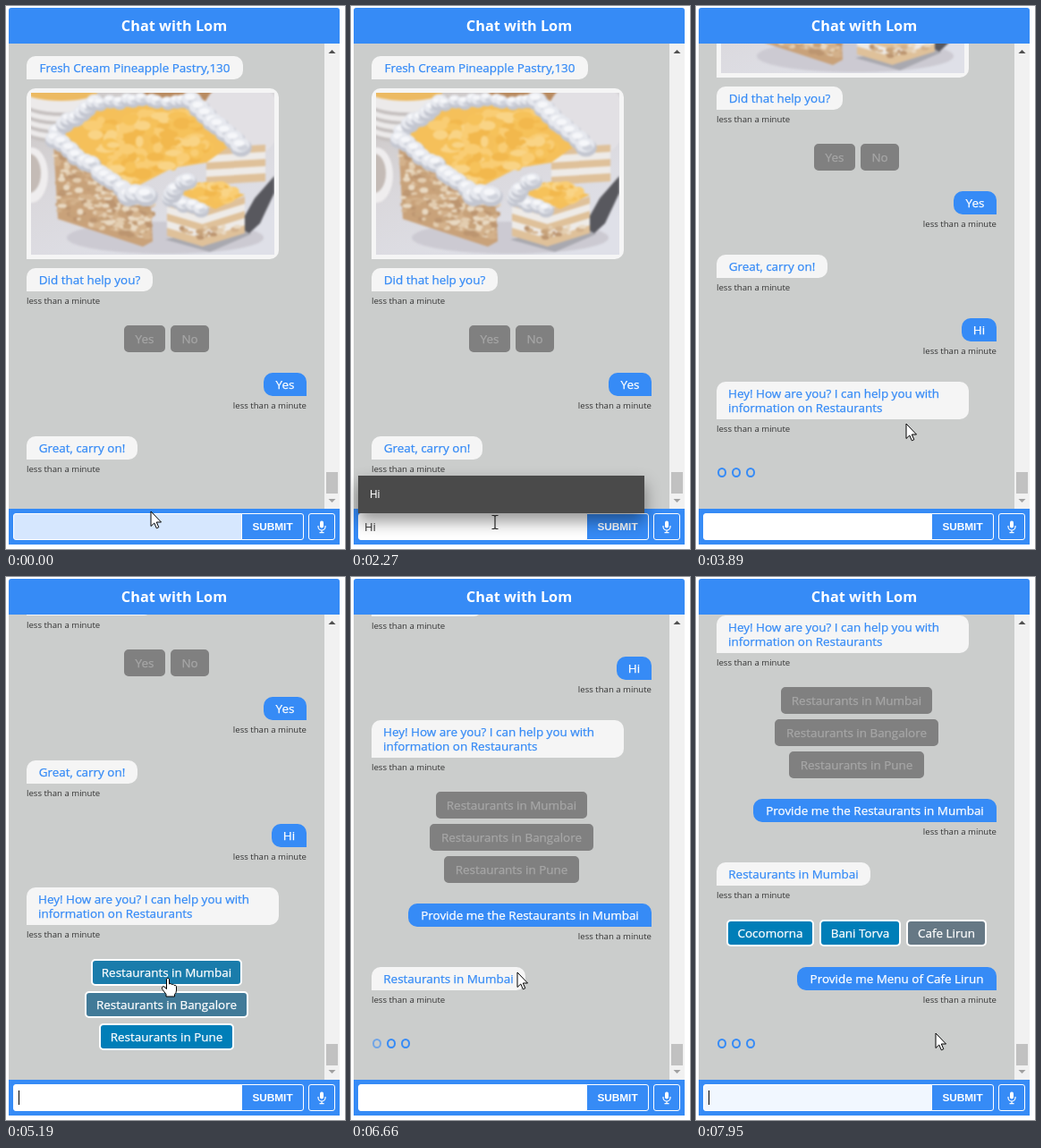
Write an HTML page that moves like this. It is 379x607 px and loops after 8 s.

```html
<!DOCTYPE html>
<html lang="en">
<head>
<meta charset="utf-8">
<title>Chat</title>
<style>
html, body { margin: 0; width: 100%; height: 100%; overflow: hidden; background: #fff; }
#stage { position: relative; width: 379px; height: 607px; overflow: hidden; background: #fff; font: 13.45px/16px "Open Sans", "Noto Sans", sans-serif; white-space: nowrap; }
#stage div, #stage svg { position: absolute; box-sizing: border-box; }
#head { left: 3px; top: 2px; width: 370px; height: 40px; background: #368bf6; border-radius: 3px 3px 0 0; color: #fff; font-weight: 700; font-size: 16.3px; line-height: 41px; text-align: center; }
#view { left: 3px; top: 42px; width: 353px; height: 520px; overflow: hidden; background: #cbcdcc; }
#feed { left: -3px; top: -42px; width: 379px; }
.bubble { padding: 5px 0; text-align: center; background: #f5f5f5; color: #368bf6; border-radius: 10px 10px 10px 0; }
.bubble.wide { text-align: left; padding-left: 13px; white-space: pre; }
.bubble.user { background: #368bf6; color: #fff; border-radius: 10px 10px 0 10px; }
.bubble, .choice { -webkit-text-stroke: .25px; }
.time { font-size: 9.6px; line-height: 14px; color: #333; }
.choice { height: 30px; border: 2px solid #fff; border-radius: 5px; text-align: center; line-height: 26px; color: #fff; }
.dot { width: 10px; height: 11px; border: 2px solid #368bf6; border-radius: 50%; }
#bar { left: 356px; top: 42px; width: 17px; height: 520px; background: #f1f1f1; }
#thumb { left: 2px; top: 479px; width: 13px; height: 24px; background: #c1c1c1; }
#foot { left: 3px; top: 562px; width: 370px; height: 40px; background: #368bf6; }
#input { left: 8px; top: 567px; width: 256px; height: 30px; border: 1px solid #fff; border-radius: 3px 0 0 3px; }
#typed { left: 6px; top: 6px; color: #333; font-size: 13px; }
#caret { left: 14px; top: 574px; width: 1px; height: 16px; background: #000; }
.key { top: 567px; height: 30px; border: 1px solid #fff; border-radius: 3px; background: #368bf6; color: #fff; }
#submit { left: 263px; width: 70px; border-radius: 0 3px 3px 0; text-align: center; font: bold 11.8px/28px "Liberation Sans", Arial, sans-serif; }
#menu { left: 8px; top: 525px; width: 320px; height: 42px; padding-left: 13px; background: #4a4a4a; color: #fff; font: 12px/43px Roboto, sans-serif; box-shadow: 0 9px 18px rgba(0,0,0,.42); }
</style>
</head>
<body>
<div id="stage">
  <div id="head">Chat with Lom</div>
  <div id="view"><div id="feed"></div></div>
  <div id="bar">
    <svg width="17" height="520"><path d="M4.500 11l4-4 4 4z" fill="#505050"/><path d="M4.500 509l4 4 4-4z" fill="#a0a0a0"/></svg>
    <div id="thumb"></div>
  </div>
  <div id="foot"></div>
  <div id="input"><div id="typed"></div></div>
  <div id="caret"></div>
  <div id="submit" class="key">SUBMIT</div>
  <div class="key" style="left:338px;width:30px">
    <svg width="28" height="28" fill="none" stroke="#fff" stroke-width="1.200"><rect x="12" y="7.500" width="4" height="8" rx="2" fill="#fff" stroke="none"/><path d="M10 13v1a4 4 0 0 0 8 0v-1M14 18V20.500M11.500 20.600h5"/></svg>
  </div>
  <div id="menu">Hi</div>
  <svg id="pointer" width="24" height="28" style="left:-.5px;top:-.5px;overflow:visible">
    <path id="arrow" d="M0 0V16.500L3.800 13 6.300 18.800 8.800 17.700 6.300 12H11.500Z" fill="#fff" stroke="#000"/>
    <path id="beam" d="M-3.500-7.500H-1L0-6.500 1-7.500H3.500M0-6.500V7M-3.500 7.500H-1L0 6.500 1 7.500H3.500" fill="none" stroke="#222" stroke-width="1.200"/>
    <path id="hand" d="M-1.500 1.500Q0-1 1.500 1.500V7Q3 5.500 4.300 7.500 6 6.500 7 8.500 9.500 7.500 9.500 11V14Q9.500 17 7.500 18.500V21H-2V18.500L-6.500 12.500Q-7 10-5 9.500L-1.500 12.500Z" fill="#fff" stroke="#000"/>
  </svg>
</div>
<script>
const LOOP = 8000;
const $ = id => document.getElementById(id);
const feed = $('feed');
const clamp = v => Math.max(0, Math.min(1, v));
const ramp = (t, start, length) => clamp((t - start) / length);
const smooth = k => k * k * (3 - 2 * k);
const mix = (a, b, k) => `rgb(${a.map((v, i) => Math.round(v + (b[i] - v) * k))})`;
const within = (t, spans) => spans.some(([a, b]) => t >= a && t < b);
const BLUE = [0, 126, 184], GRAY = [119, 119, 125], OFF = [128, 128, 128], WHITE = [255, 255, 255];

// Feed content is laid out in one tall column; `from` is when an item appears.
const timed = [];
function add(cls, x, y, w, text, from = 0, to = LOOP) {
  const el = document.createElement('div');
  el.className = cls;
  el.textContent = text;
  el.style.cssText = `left:${x}px;top:${y}px;${w ? `width:${w}px` : ''}`;
  feed.append(el);
  timed.push({ el, from, to });
  return el;
}
function bot(y, w, text, from, stamp = true) {
  const wide = text.includes('\n');
  add(wide ? 'bubble wide' : 'bubble', 23, y, w, text, from);
  if (stamp) add('time', 23, y + (wide ? 46 : 30), 0, 'less than a minute', from);
}
function user(y, w, text, from) {
  add('bubble user', 336 - w, y, w, text, from);
  add('time', 236, y + 30, 100, 'less than a minute', from).style.textAlign = 'right';
}

const SENT = [2830, 5760, 7880], REPLY = [3580, 6160], OFFER = [4440, 6940];

drawCake();
bot(56, 242, 'Fresh Cream Pineapple Pastry,130', 0, false);
bot(293, 141, 'Did that help you?', 0);
user(410, 48, 'Yes', 0);
bot(481, 124, 'Great, carry on!', 0);
user(552, 39, 'Hi', SENT[0]);
bot(623, 282, 'Hey! How are you? I can help you with\ninformation on Restaurants', REPLY[0]);
user(828, 272, 'Provide me the Restaurants in Mumbai', SENT[1]);
bot(899, 172, 'Restaurants in Mumbai', REPLY[1]);
user(1016, 223, 'Provide me Menu of Cafe Lirun', SENT[2]);

// x, y, width, label, appears, hover span, disabled at
const choices = [
  [132, 357, 46, 'Yes', 0, null, -999],
  [184, 357, 43, 'No', 0, null, -999],
  [95, 703, 169, 'Restaurants in Mumbai', OFFER[0], [5100, 5760], 5840],
  [88, 739, 183, 'Restaurants in Bangalore', OFFER[0], [4720, 5050], 5840],
  [104, 775, 151, 'Restaurants in Pune', OFFER[0], null, 5840],
  [34, 963, 98, 'Cocomorna', OFFER[1], null, LOOP],
  [138, 963, 91, 'Bani Torva', OFFER[1], null, LOOP],
  [235, 963, 90, 'Cafe Lirun', OFFER[1], [7280, 7880], LOOP]
].map(([x, y, w, text, from, hover, off]) => ({ el: add('choice', x, y, w, text, from), hover, off }));

// Typing dots: from, to, scroll offset
[[SENT[0], REPLY[0], 116], [REPLY[0], OFFER[0], 203], [SENT[1], REPLY[1], 392],
 [REPLY[1], OFFER[1], 463], [SENT[2], LOOP, 580]].forEach(([from, to, scroll]) =>
  [24, 40, 56].forEach((x, i) => {
    const dot = add('dot', x, 516 + scroll, 0, '', from, to);
    if (from === REPLY[1] && !i) dot.style.opacity = 0.6;
  }));

const scrolls = [[0, 0], [SENT[0], 116], [REPLY[0], 203], [OFFER[0], 276], [SENT[1], 392], [REPLY[1], 463], [OFFER[1], 464], [SENT[2], 580]];
const carets = [[700, 1220], [1530, 2040], [2330, 3330], [3895, 4420], [4950, 5400], [5630, 6180], [6700, 7220], [7750, 8000]];
const path = [[0, 162, 565], [49, 162, 565], [50, 162, 574], [200, 162, 574], [230, 161, 577], [2590, 161, 577], [2830, 160, 577],
  [3580, 160, 577], [3890, 235, 467], [4370, 238, 508], [4700, 220, 500], [5050, 186, 468], [5190, 181, 448], [5330, 186, 442],
  [6690, 186, 442], [7000, 215, 476], [7300, 258, 504], [7460, 268, 510], [LOOP, 268, 510]];

function pointerAt(t) {
  const i = Math.max(1, path.findIndex(p => p[0] > t));
  const [t0, x0, y0] = path[i - 1], [t1, x1, y1] = path[i];
  const e = smooth(ramp(t, t0, t1 - t0));
  return [x0 + (x1 - x0) * e, y0 + (y1 - y0) * e];
}

function hoverLevel(t, span) {
  return span ? smooth(Math.min(ramp(t, span[0], 300), 1 - ramp(t, span[1], 300))) : 0;
}

function draw(t) {
  for (const { el, from, to } of timed) el.style.display = t >= from && t < to ? '' : 'none';
  const scroll = scrolls.filter(s => s[0] <= t).pop()[1];
  feed.style.transform = `translateY(${-scroll}px)`;
  $('thumb').style.top = (t >= OFFER[0] ? 480 : 479) + 'px';

  for (const { el, hover, off } of choices) {
    const gone = ramp(t, off, 150), h = hoverLevel(t, hover);
    const fill = BLUE.map((v, i) => v + (GRAY[i] - v) * h);
    el.style.background = mix(fill, OFF, gone);
    el.style.borderColor = mix(WHITE, OFF, gone);
    el.style.color = mix(WHITE, [166, 166, 166], gone);
  }

  // The field is tinted while unfocused.
  const focus = t < 5400 ? ramp(t, 660, 260)
    : t < 7550 ? Math.max(1 - ramp(t, 5400, 230), ramp(t, 5630, 300))
    : Math.max(1 - ramp(t, 7550, 200), ramp(t, 7750, 300));
  $('input').style.background = mix([214, 231, 254], WHITE, focus);
  const typed = t >= 1530 && t < SENT[0] ? (t < 2020 ? 'H' : 'Hi') : '';
  $('typed').textContent = typed;
  $('caret').style.left = [14, 25, 28][typed.length] + 'px';
  $('caret').style.display = within(t, carets) ? '' : 'none';
  $('menu').style.opacity = t < 2020
    ? Math.min(ramp(t, 660, 260), 1 - ramp(t, 1500, 90))
    : Math.min(ramp(t, 2000, 260), 1 - ramp(t, 2490, 100));

  const [x, y] = pointerAt(t);
  $('pointer').style.transform = `translate(${x}px,${y}px)`;
  const shape = within(t, [[50, 3640]]) ? 'beam' : within(t, [[4700, 5760], [7280, 7880]]) ? 'hand' : 'arrow';
  for (const id of ['arrow', 'beam', 'hand']) $(id).style.display = id === shape ? '' : 'none';
}

// A soft illustration of the pastry in flat shapes.
function drawCake() {
  let seed = 7;
  const rnd = () => (seed = seed * 16807 % 2147483647) / 2147483647;
  const shape = (d, fill) => `<path d="${d}" fill="${fill}"/>`;
  const oval = (x, y, rx, ry, fill) => `<ellipse cx="${x.toFixed(1)}" cy="${y.toFixed(1)}" rx="${rx.toFixed(1)}" ry="${ry.toFixed(1)}" fill="${fill}"/>`;
  const scatter = (n, place, colors, size) => Array.from({ length: n }, (_, i) => {
    const [x, y] = place(rnd(), rnd());
    return oval(x, y, size * (0.6 + rnd()), size * (0.4 + rnd() * 0.6), colors[i % colors.length]);
  }).join('');
  const cream = (x0, y0, x1, y1, n, r) => Array.from({ length: n }, (_, i) => {
    const k = i / (n - 1), x = x0 + (x1 - x0) * k + rnd() * 5 - 2.5, y = y0 + (y1 - y0) * k + rnd() * 5 - 2.5;
    return oval(x, y + 2, r, r * 0.85, '#c3c6d0') + oval(x - 1, y - 1, r * 0.9, r * 0.7, '#e6e8ee')
      + oval(x + 2, y + 2, r * 0.5, r * 0.3, '#cfd2db') + oval(x - 2, y - 3, r * 0.5, r * 0.3, '#f6f7fa');
  }).join('');
  const quad = (a, b, c, d) => (u, v) => [0, 1].map(i =>
    (a[i] * (1 - u) + b[i] * u) * (1 - v) + (d[i] * (1 - u) + c[i] * u) * v);
  const layers = (x, y, w, dy, h) => [0, 1, 2, 3, 4].map(i =>
    shape(`M${x} ${y + i * h}l${w} ${dy}v${h + 1}l${-w} ${-dy}z`, i % 2 ? '#eeebe8' : '#dfc19a')).join('');
  const almond = ['#d3b18b', '#bc9570', '#e3cdb0', '#c7a27a', '#e9d9c2'];
  const fruit = ['#f6c25a', '#f9cd74', '#f2b84d', '#f9d486'];
  const card = document.createElement('div');
  card.style.cssText = 'left:23px;top:92px;width:282px;height:191px;background:#f5f5f5;border-radius:10px 10px 10px 0';
  card.innerHTML = `<svg width="272" height="181" style="left:5px;top:5px;overflow:hidden">
    <defs><linearGradient id="cloth" x2=".6" y2="1"><stop stop-color="#c9c4c2"/><stop offset=".5" stop-color="#dad8dc"/><stop offset="1" stop-color="#dfe0e8"/></linearGradient></defs>
    <rect width="272" height="181" fill="url(#cloth)"/>
    <g style="filter:blur(.8px)">
    ${[42, 32, 22, 12].map(y => oval(34, y, 44, 14, '#c6c1c0') + oval(34, y - 3, 43, 13, '#eceaea')).join('')}
    ${oval(34, 0, 40, 9, '#ecba62')}
    ${oval(166, 3, 42, 12, '#b98b60')}${oval(235, 30, 45, 45, '#e2e0e4')}
    ${oval(0, 92, 19, 31, '#efedee')}${oval(-2, 90, 13, 22, '#c4bbb6')}
    ${oval(150, 162, 110, 18, '#cccad2')}
    ${shape('M150 164L236 146 246 158 200 178Z', '#a9a9b0')}
    ${shape('M232 150L250 118 272 93V112L256 146 244 157Z', '#58585e')}
    ${shape('M25 55L133 110 136 166 125 172 30 141Z', '#c9a27a')}
    ${scatter(290, quad([26, 60], [136, 112], [134, 168], [32, 138]), almond, 3.5)}
    ${layers(196, 62, 66, -4, 8)}
    ${shape('M32 43L60 10 190 10 224 58 196 78 158 84 108 110 34 60Z', '#f5c05a')}
    ${scatter(150, quad([48, 34], [180, 15], [200, 68], [106, 100]), fruit, 7)}
    ${cream(30, 42, 70, 10, 7, 10)}${cream(70, 10, 180, 8, 13, 8)}${cream(180, 10, 236, 58, 8, 12)}
    ${cream(28, 50, 108, 112, 11, 11)}${cream(108, 112, 127, 114, 3, 13)}
    ${layers(152, 119, 40, 12, 8)}${layers(191, 131, 48, -15, 8)}
    ${scatter(25, quad([153, 152], [239, 148], [225, 156], [188, 164]), almond, 3)}
    ${shape('M165 112L188 100 239 114 206 130Z', '#f5c05a')}
    ${scatter(30, quad([180, 104], [212, 102], [233, 114], [200, 126]), fruit, 6)}
    ${cream(155, 118, 190, 128, 5, 9)}${cream(156, 112, 176, 96, 4, 10)}
    </g>
  </svg>`;
  feed.append(card);
}

const began = performance.now();
function tick() {
  draw((performance.now() - began) % LOOP);
  requestAnimationFrame(tick);
}
tick();
</script>
</body>
</html>
```
